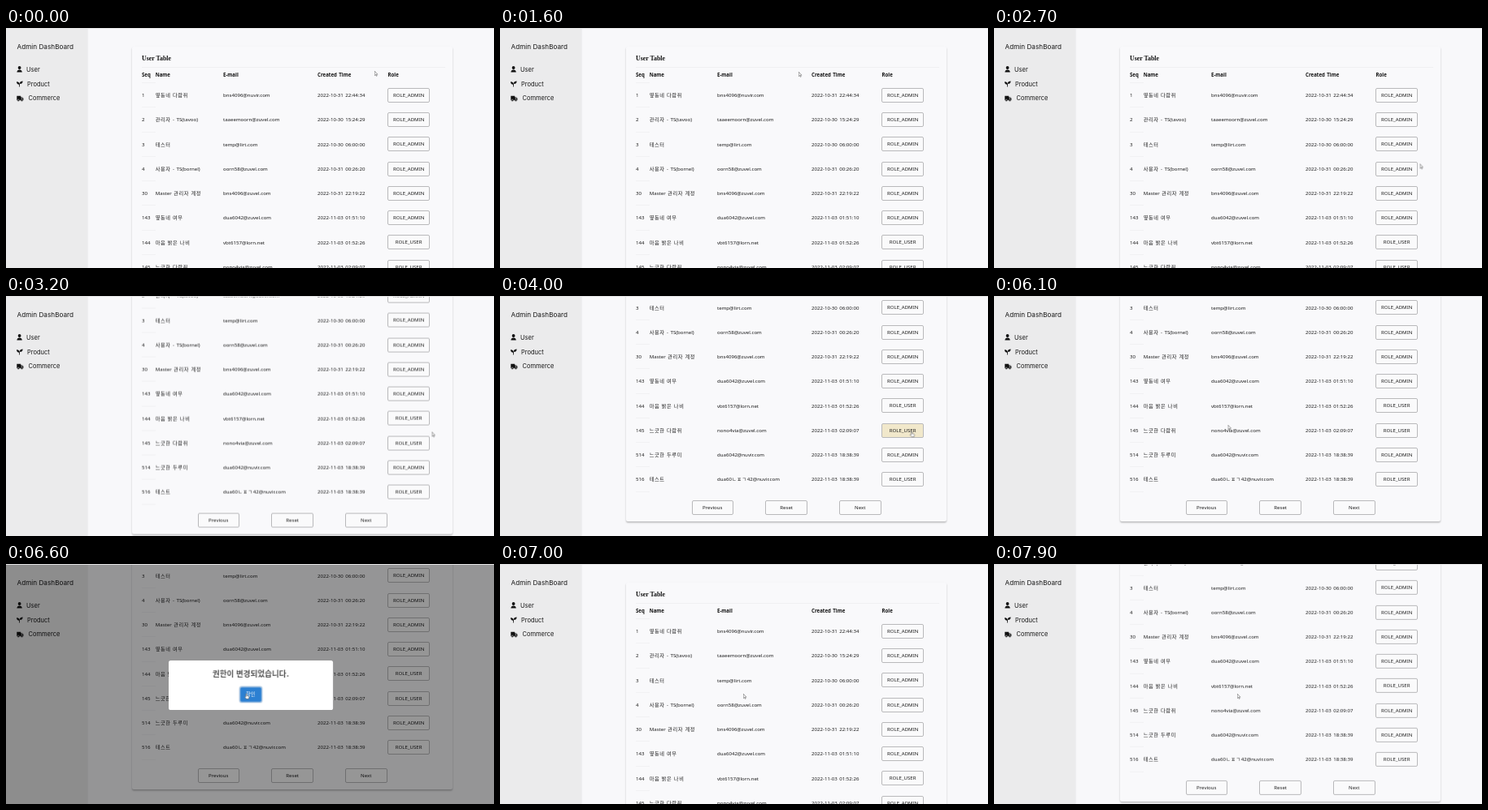
An HTML page that plays this animation: 600x296 px, repeating every 8 s.

```html
<!DOCTYPE html>
<html lang="ko">
<head>
<meta charset="utf-8">
<title>Admin DashBoard</title>
<style>
  html, body { margin: 0; width: 100%; height: 100%; overflow: hidden; }
  body { background: #f8f8fa; }
  #stage {
    position: relative; width: 600px; height: 296px; overflow: hidden;
    font: 6.1px/1 "Noto Sans", "Noto Sans CJK KR", "Noto Sans CJK", sans-serif;
    color: #1c1c1c; background: #f8f8fa; white-space: nowrap;
  }
  #stage * { box-sizing: border-box; }
  #stage div, #stage span, svg { position: absolute; }
  .anim, #page, #cursor, .role, .hot { animation: 8s linear infinite; }

  /* sidebar */
  #side {
    left: 0; top: 0; width: 99.5px; height: 296px; background: #ebebec;
    box-shadow: .5px 0 1.5px rgba(0, 0, 0, .1);
    font: 7.5px/10px Inter, sans-serif; color: #181818;
  }
  #side .brand { left: 13.5px; top: 18px; font-size: 8.2px; }
  #side svg { left: 13px; width: 9px; height: 8px; fill: #111; }
  .edge { left: 0; top: 0; width: 600px; height: 1px; background: #e4e4e5; }

  /* table */
  #page { left: 0; top: 0; width: 600px; height: 425px; animation-name: scroll; }
  .card {
    left: 155px; top: 23px; width: 394px; height: 383.5px; border-radius: 2px;
    background: #f9f9fb; box-shadow: 0 1.5px 2px rgba(0, 0, 0, .26);
  }
  .title { left: 167px; top: 33px; font: bold 7.9px/10px "Liberation Serif", serif; color: #111; }
  .rule { left: 167px; top: 48px; width: 373px; height: 1px; background: #f0f0f2; }
  .row { left: 0; width: 600px; height: 30.25px; line-height: 30.25px; }
  .row::after {
    content: ""; position: absolute; left: 167px; bottom: 0;
    width: 17px; height: 1px; background: #f1f1f3;
  }
  .head { top: 48px; height: 20px; line-height: 20px; font-weight: bold; color: #111; }
  .row i { font-style: normal; font-size: 6.2px; font-weight: 300; letter-spacing: .6px; line-height: 1; }
  .c0 { left: 167px; } .c1 { left: 183.7px; word-spacing: .9px; } .c2 { left: 267px; }
  .c3 { left: 383px; word-spacing: .8px; } .c4 { left: 469.5px; word-spacing: 0; }
  .btn {
    width: 51.5px; height: 18px; line-height: 16.5px; text-align: center;
    border: .75px solid #b9b9bb; border-radius: 2px; background: #fafafb;
  }
  .row .btn { left: 469.4px; top: 5.8px; }
  .btn .role { left: 0; width: 100%; }
  .hot { animation-name: hover; }
  .before { animation-name: before; }
  .after { animation-name: after; }

  /* dialogs */
  .veil { left: 0; top: 1px; width: 600px; height: 295px; background: rgba(0, 0, 0, .4); }
  .box {
    left: 199.5px; top: 118px; width: 201.5px; height: 61px; border-radius: 2.5px;
    background: #fff; text-align: center;
  }
  .box .ask {
    left: 0; top: 8.5px; width: 100%; color: #545454;
    font: bold 9.6px/14px "Noto Sans CJK KR", "Noto Sans CJK", sans-serif;
  }
  .box .pick {
    top: 33px; width: 26.5px; height: 17.5px; border-radius: 2px; color: #fff;
    font-size: 6.3px; line-height: 17px;
  }
  .yes { left: 72.5px; background: #2c80d2; box-shadow: 0 0 0 1.5px rgba(100, 150, 200, .5); }
  .no { left: 102.5px; background: #dc3234; }
  .only { left: 87.5px; }
  #ask { animation-name: veil1; }
  #ask .box { animation-name: pop1; }
  #done { animation-name: veil2; }
  #done .box { animation-name: pop2; }

  /* pointer */
  #cursor { left: .5px; top: -.5px; width: 8.5px; height: 10.2px; overflow: visible; animation-name: move; }
  #cursor path { fill: #fff; stroke: #484848; stroke-width: .6; stroke-linejoin: round; }
  .arrow { animation-name: arrow; }
  .hand { animation-name: hand; }

  @keyframes scroll {
    0%, 34.4% { transform: translateY(0); animation-timing-function: ease-in-out; }
    41.8%, 86.87% { transform: translateY(-129px); }
    86.88%, 95.6% { transform: translateY(0); }
    98.75% { transform: translateY(-114px); }
    100% { transform: translateY(-129px); }
  }
  @keyframes move {
    0%, .6% { transform: translate(452px, 53px); }
    3.75% { transform: translate(351.5px, 1.5px); }
    5% { transform: translate(348px, -14px); }
    15.6% { transform: translate(363px, -14px); }
    16.25% { transform: translate(362px, 13px); animation-timing-function: ease-out; }
    20%, 21.9% { transform: translate(366px, 54px); animation-timing-function: ease-in-out; }
    32.5%, 41.9% { transform: translate(522.5px, 167.5px); animation-timing-function: ease-in-out; }
    46.25%, 52.5% { transform: translate(505px, 167px); }
    55% { transform: translate(496px, 167px); }
    56.25% { transform: translate(452px, 166px); animation-timing-function: ease-out; }
    66.25%, 80.6% { transform: translate(286.5px, 159px); animation-timing-function: ease-in-out; }
    83.75%, 100% { transform: translate(298px, 160px); }
  }
  @keyframes arrow {
    0%, 43.1% { opacity: 1; }
    43.11%, 52% { opacity: 0; }
    52.01%, 61.2% { opacity: 1; }
    61.21%, 74.2% { opacity: 0; }
    74.21%, 81.2% { opacity: 1; }
    81.21%, 85.7% { opacity: 0; }
    85.71%, 100% { opacity: 1; }
  }
  @keyframes hand {
    0%, 43.1% { opacity: 0; }
    43.11%, 52% { opacity: 1; }
    52.01%, 61.2% { opacity: 0; }
    61.21%, 74.2% { opacity: 1; }
    74.21%, 81.2% { opacity: 0; }
    81.21%, 85.7% { opacity: 1; }
    85.71%, 100% { opacity: 0; }
  }
  @keyframes hover {
    0%, 43.1% { background: #fafafb; }
    43.6%, 52% { background: #f1e8cb; }
    52.5%, 100% { background: #fafafb; }
  }
  @keyframes before { 0%, 86.87% { opacity: 1; } 86.88%, 100% { opacity: 0; } }
  @keyframes after { 0%, 86.87% { opacity: 0; } 86.88%, 100% { opacity: 1; } }
  @keyframes veil1 {
    0%, 51.9% { opacity: 0; }
    53.1%, 73.6% { opacity: 1; }
    75.4%, 100% { opacity: 0; }
  }
  @keyframes pop1 {
    0%, 51.9% { transform: scale(.7); }
    53.6% { transform: scale(1.05); }
    54.9% { transform: scale(.95); }
    55.6%, 73.6% { transform: none; }
    75.4%, 100% { transform: scale(.5); }
  }
  @keyframes veil2 {
    0%, 78.1% { opacity: 0; }
    79.4%, 85% { opacity: 1; }
    86.85%, 100% { opacity: 0; }
  }
  @keyframes pop2 {
    0%, 78.1% { transform: scale(.7); }
    79.8% { transform: scale(1.05); }
    81.1% { transform: scale(.95); }
    81.9%, 85% { transform: none; }
    86.85%, 100% { transform: scale(.5); }
  }
</style>
</head>
<body>
<div id="stage">
  <div id="page">
    <div class="card"></div>
    <div class="title">User Table</div>
    <div class="rule"></div>
    <div class="row head">
      <span class="c0">Seq</span><span class="c1">Name</span><span class="c2">E-mail</span>
      <span class="c3">Created Time</span><span class="c4">Role</span>
    </div>
    <div id="rows"></div>
    <div class="btn" style="left:235.5px;top:381px">Previous</div>
    <div class="btn" style="left:326.4px;top:381px">Reset</div>
    <div class="btn" style="left:417px;top:381px">Next</div>
  </div>

  <div id="side">
    <div class="brand">Admin DashBoard</div>
    <svg style="top:47px" viewBox="0 0 9 8"><circle cx="3.6" cy="2" r="1.9"/><path d="M.4 7.6C.4 3.6 6.8 3.6 6.8 7.6Z"/></svg>
    <span style="left:25px;top:47px">User</span>
    <svg style="top:65px" viewBox="0 0 9 8"><path d="M0 1.2C2.6 1.2 4 2.6 4 4.6V7.4H3.2V4.8C1.2 4.8 0 3.4 0 1.2ZM7.6.4C5.4.4 4 1.5 3.9 2.7L4.5 4C6.6 3.8 7.6 2.6 7.6.4Z"/></svg>
    <span style="left:26px;top:65px">Product</span>
    <svg style="top:82.5px" viewBox="0 0 9 8"><path d="M.3.7H5.2V1.9H6.8L8.4 3.7V6.2H.3Z"/><path d="M5.7 2.5H6.6L7.6 3.7H5.7Z" fill="#ebebec"/><g stroke="#ebebec" stroke-width=".5"><circle cx="2.2" cy="6.3" r="1.2"/><circle cx="6.5" cy="6.3" r="1.2"/></g></svg>
    <span style="left:27.5px;top:82.4px">Commerce</span>
  </div>

  <div id="ask" class="veil anim">
    <div class="box anim">
      <div class="ask">사용자 권한을 변경하시겠습니까?</div>
      <div class="pick yes">확인</div>
      <div class="pick no">취소</div>
    </div>
  </div>
  <div id="done" class="veil anim">
    <div class="box anim">
      <div class="ask">권한이 변경되었습니다.</div>
      <div class="pick yes only">확인</div>
    </div>
  </div>

  <div class="edge"></div>
  <svg id="cursor" viewBox="0 0 10 12">
    <path class="arrow anim" d="M.3.3V6.6L1.8 5.3 2.8 7.5 3.7 7.1 2.7 4.9H4.6Z"/>
    <path class="hand anim" d="M-.5.6C-.5-.2.7-.2.7.6V3.2L3.4 3.8C4 4 4.2 4.4 4.1 5L3.6 7.9H.2L-2 5.1C-2.2 4.4-1.4 4.1-.5 5Z"/>
  </svg>
</div>

<script>
  const users = [
    [1, '옆동네 다람쥐', 'bns4096@nuvir.com', '2022-10-31 22:44:34', 'ADMIN'],
    [2, '관리자 - TS(tavoo)', 'taaeemoorn@zuvel.com', '2022-10-30 15:24:29', 'ADMIN'],
    [3, '테스터', 'temp@lirt.com', '2022-10-30 06:00:00', 'ADMIN'],
    [4, '사용자 - TS(bornel)', 'oorn58@zuvel.com', '2022-10-31 00:26:20', 'ADMIN'],
    [30, 'Master 관리자 계정', 'bns4096@zuvel.com', '2022-10-31 22:19:22', 'ADMIN'],
    [143, '옆동네 여우', 'dua6042@zuvel.com', '2022-11-03 01:51:10', 'ADMIN'],
    [144, '마음 밝은 나비', 'vbt6157@lorn.net', '2022-11-03 01:52:26', 'USER'],
    [145, '느긋한 다람쥐', 'nono4via@zuvel.com', '2022-11-03 02:09:07', 'USER'],
    [514, '느긋한 두루미', 'dua6042@nuvir.com', '2022-11-03 18:38:39', 'ADMIN'],
    [516, '테스트', 'dua60ㄴㅍㄱ42@nuvir.com', '2022-11-03 18:38:39', 'USER']
  ];
  const hangul = s => String(s).replace(/[ㄱ-ㅎ가-힣]+/g, '<i>$&</i>');
  const button = (seq, role) => seq === 145
    ? '<div class="btn hot"><span class="role before">ROLE_USER</span><span class="role after">ROLE_ADMIN</span></div>'
    : `<div class="btn">ROLE_${role}</div>`;

  document.getElementById('rows').innerHTML = users.map((user, n) => {
    const cells = user.slice(0, 4).map((v, c) => `<span class="c${c}">${hangul(v)}</span>`);
    return `<div class="row" style="top:${68.2 + n * 30.25}px">${cells.join('')}${button(user[0], user[4])}</div>`;
  }).join('');
</script>
</body>
</html>
```
